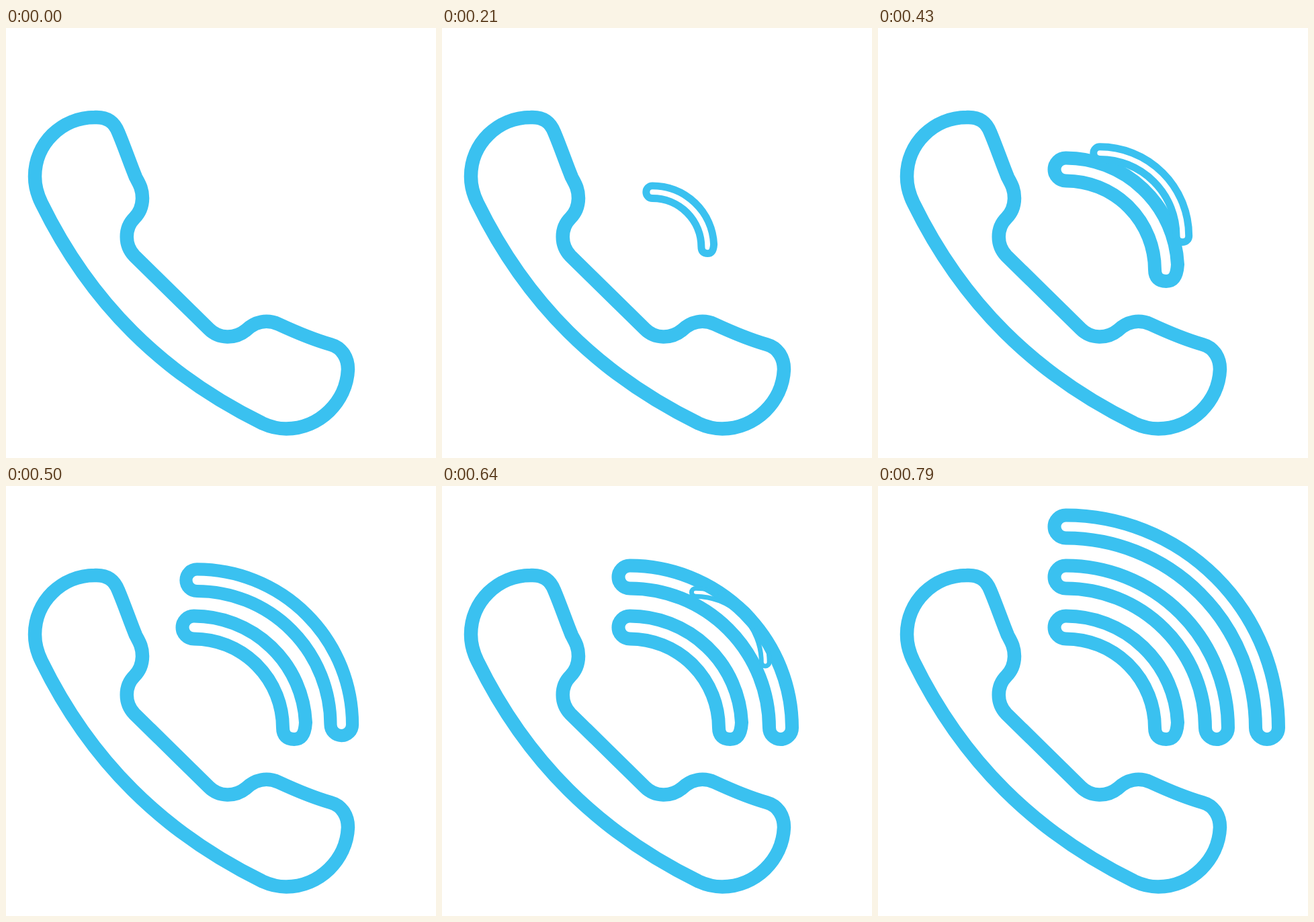
Write an HTML page that moves like this. It is 640 px wide and 640 px high and loops after 1280 ms.

```html
<!DOCTYPE html>
<html lang="en">
<head>
<meta charset="utf-8">
<title>Ringing phone</title>
<style>
  html, body { margin: 0; width: 100%; height: 100%; overflow: hidden; background: #fff; }
  svg { display: block; width: 100vw; height: 100vh; }
</style>
</head>
<body>
<svg viewBox="0 0 640 640">
  <g id="art" fill="none" stroke="#3ac1f0" stroke-width="20">
    <path stroke-width="20.5" d="M132 133C150 132 161 140 167 155C176 176 184 200 193 222
      C197 230 203 238 203 253C203 265 199 275 191 283C176 298 176 323 191 339
      L302 448C317 463 341 463 357 450C371 437 388 433 406 441
      C432 453 455 463 483 471C501 476 509 492 509 508C507 556 467 596 417 596.5
      C404 596.5 393 593.5 382 588.5C232 515 125 408 53 261
      C47 249 43 236 43 221C43 172 83 133 132 133Z"/>
  </g>
</svg>
<script>
const LOOP = 1280;
const TICKS = [0, 70, 140, 210, 290, 360, 430, 500, 570, 640, 710, 790];
const HUB = { x: 279.5, y: 360 };
const BAND = 34;

// Each wave grows from its middle; "from" is the tick at which it appears.
const GROW = [0.02, 0.11, 0.549, 0.958, 1];
const WAVES = [
  { r: 166.5, from: 1, grow: GROW, leaning: true },
  { r: 241.5, from: 4, grow: GROW },
  { r: 316.5, from: 7, grow: [0.02, 0.07, 0.347, 0.85, 1] }
];

function bandPath(r, leaning) {
  const { x, y } = HUB;
  const inner = r - BAND, cap = BAND / 2, right = x + r;
  const end = leaning
    ? `A${r} ${r} 0 0 1 ${right} ${y - 8}
       C${right - 1} ${y + 8} ${right - 5} ${y + cap} ${right - cap} ${y + cap}
       C${right - 28} ${y + cap} ${right - BAND} ${y + 11} ${right - BAND} ${y}`
    : `A${r} ${r} 0 0 1 ${right} ${y} A${cap} ${cap} 0 0 1 ${right - BAND} ${y}`;
  return `M${x} ${y - r} ${end}
    A${inner} ${inner} 0 0 0 ${x} ${y - inner}
    A${cap} ${cap} 0 0 1 ${x} ${y - r}Z`;
}

const art = document.getElementById("art");
for (const wave of WAVES) {
  wave.el = document.createElementNS("http://www.w3.org/2000/svg", "path");
  wave.el.setAttribute("d", bandPath(wave.r, wave.leaning));
  art.append(wave.el);
}

function draw(ms) {
  const tick = TICKS.findLastIndex(t => t <= ms);
  for (const { el, r, from, grow } of WAVES) {
    const age = tick - from;
    el.style.display = age < 0 ? "none" : "";
    if (age < 0) continue;
    const scale = grow[Math.min(age, grow.length - 1)];
    const half = (r - BAND / 2) / 2;
    const cx = HUB.x + half, cy = HUB.y - half;
    el.setAttribute("transform",
      `translate(${cx} ${cy}) scale(${scale}) translate(${-cx} ${-cy})`);
  }
}

const start = performance.now();
function loop() {
  draw((performance.now() - start) % LOOP);
  requestAnimationFrame(loop);
}
loop();
</script>
</body>
</html>
```
